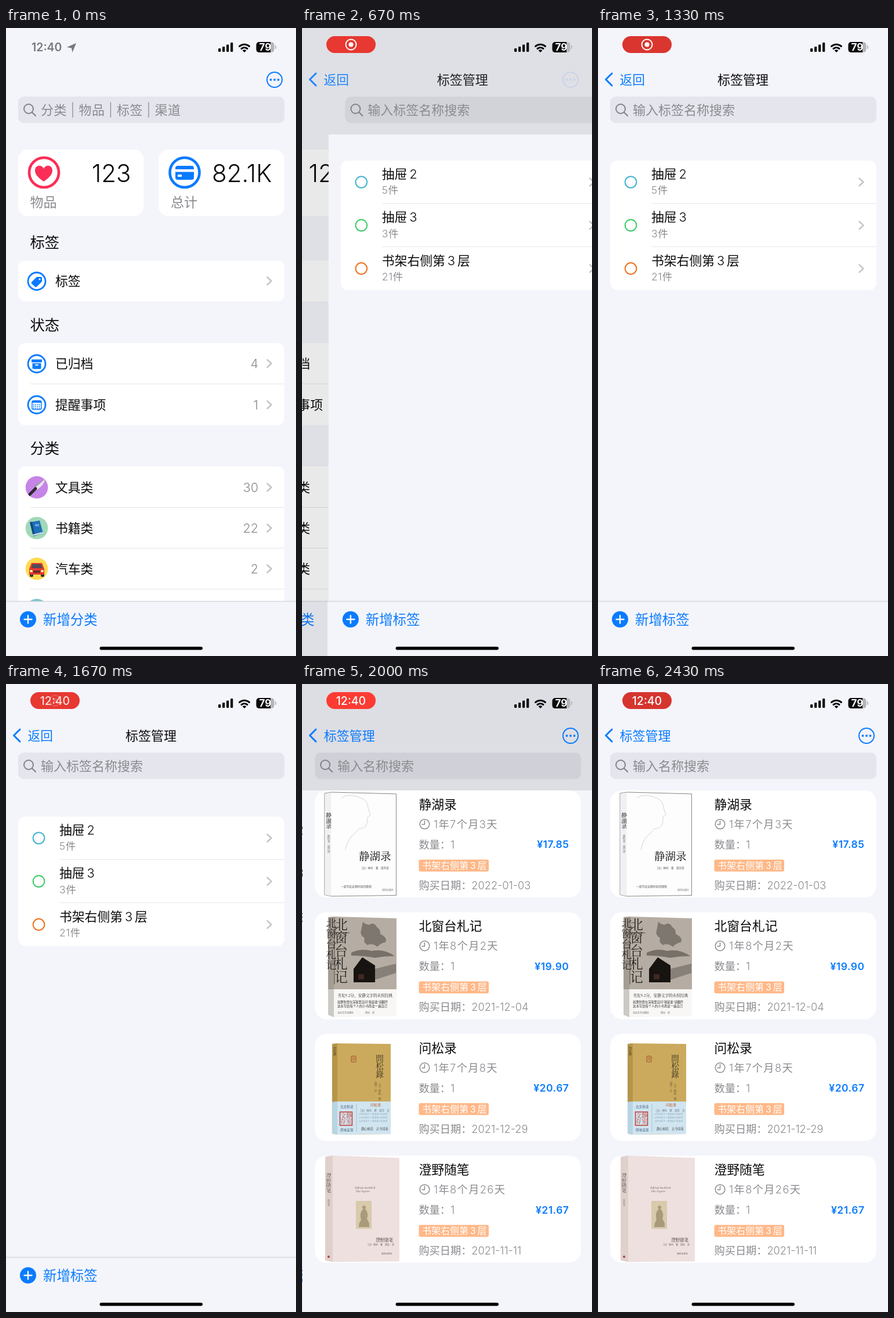
An HTML page that plays this animation: 500 by 1080 pixels, repeating every 2.69 s.

```html
<!DOCTYPE html>
<html lang="zh-CN">
<head>
<meta charset="utf-8">
<style>
html, body { margin: 0; height: 100%; overflow: hidden; background: #f4f5fb; }
svg { display: block; width: 500px; height: 1080px; font-family: Inter, "Noto Sans CJK SC", "Noto Sans CJK", sans-serif; font-weight: 350; }
.serif { font-family: "Noto Serif CJK SC", "Noto Serif", "Noto Sans CJK SC", serif; }
.vert { writing-mode: vertical-rl; }
</style>
</head>
<body>
<svg id="stage" viewBox="0 0 500 1080"></svg>
<script>
const BG = '#f4f5fb', BLUE = '#0a7bff', GREY = '#8a8a8f', INK = '#0b0b0d';
const $ = id => document.getElementById(id);

const rect = (x, y, w, h, fill, r = 0, more = '') =>
  `<rect x="${x}" y="${y}" width="${w}" height="${h}" rx="${r}" fill="${fill}" ${more}/>`;
const circle = (x, y, r, fill, more = '') => `<circle cx="${x}" cy="${y}" r="${r}" fill="${fill}" ${more}/>`;
const ring = (x, y, r, color, w) => circle(x, y, r, 'none', `stroke="${color}" stroke-width="${w}"`);
const shape = (d, fill, more = '') => `<path d="${d}" fill="${fill}" ${more}/>`;
const line = (d, color, w, more = '') =>
  `<path d="${d}" fill="none" stroke="${color}" stroke-width="${w}" stroke-linecap="round" stroke-linejoin="round" ${more}/>`;
// y is the middle of the line of text
const text = (x, y, size, str, fill = INK, more = '') =>
  `<text x="${x}" y="${y + size * .37}" font-size="${size}" fill="${fill}" ${more}>${str}</text>`;
const down = (x, y, size, str, fill = INK, more = '') =>
  `<text class="vert serif" x="${x}" y="${y}" font-size="${size}" fill="${fill}" ${more}>${str}</text>`;
const group = (id, content) => `<g id="${id}">${content}</g>`;
const MEDIUM = 'font-weight="500"', BOLD = 'font-weight="600"', END = 'text-anchor="end"', MID = 'text-anchor="middle"';

const chevron = y => line(`M450.5 ${y - 6.5}l7 6.5-7 6.5`, '#c3c3c8', 2.4);
const rule = (x, y) => rect(x, y, 480 - x, 1, '#e4e4e8');
const search = (hint, more) => rect(21, 118, 459, 45.5, 'rgba(118,118,128,.12)', 10) +
  ring(39, 139, 8, '#828287', 2) + line('M45 145l6 6', '#828287', 2.2) + text(60, 141, 22, hint, GREY, more);
const toolbar = label => rect(-2, 986, 504, 94, BG) + rect(-2, 985.5, 504, 1, '#c8c9ce') +
  circle(38, 1017, 14, BLUE) + line('M31.500 1017h13M38 1010.500v13', '#fff', 2.4) +
  text(64, 1017, 23.4, label, BLUE, MEDIUM);

function homePage() {
  const row = (y, icon, label, count = '') =>
    icon + text(85, y, 21.8, label) + text(435, y, 21.5, count, GREY, END) + chevron(y);
  const badge = (y, art) => ring(53, y, 15, BLUE, 2.8) + art;
  const tag = shape('M44 437l9-9h7q2 0 2 2v6l-9 9q-1.500 1-3 0l-6-5.500q-1-1.200 0-2.500z', BLUE) + circle(58, 432, 1.5, '#fff');
  const box = rect(44, 570, 18, 5, BLUE, 1) + shape('M45.500 576.500h15v8q0 2-2 2h-11q-2 0-2-2z', BLUE) + rect(50, 578.5, 6, 2, '#fff', 1);
  let dots = '';
  for (let i = 0; i < 12; i++) dots += rect(47 + i % 4 * 3.3, 647 + (i / 4 | 0) * 3, 1.8, 1.6, BLUE);
  const calendar = rect(45, 641, 16, 15, 'none', 2.5, `stroke="${BLUE}" stroke-width="1.500"`) + rect(45, 641, 16, 3.5, BLUE) + dots;
  const knife = circle(53, 790, 19.3, '#c684e6') + shape('M67 776q0 8-13 18l-4-4z', '#e4e6ea') +
    shape('M67 776l-17 14-1-2z', '#8d9298') + line('M51 792l-10 10', '#2b2a30', 5);
  const book = circle(53, 860, 19.3, '#a1d8b7') + shape('M41 850l17-3 6 22-17 5z', '#1d6fb8') +
    shape('M41 850l4-1 5 24-3 1z', '#124a82') + line('M47 872l16-4', '#e9eef2', 2) + rect(50, 853, 7, 4, '#5fa4dc');
  const car = circle(53, 930, 19.3, '#ffdb51') + rect(41, 936, 6, 8, '#333', 2) + rect(60, 936, 6, 8, '#333', 2) +
    shape('M44 920h18l4 10v10h-26v-10z', '#e23a2e') + shape('M46 922h14l2.500 7h-19z', '#514b58') +
    rect(41, 932, 5, 4, '#fff0b5', 2) + rect(60, 932, 5, 4, '#fff0b5', 2) + rect(47, 933, 12, 4, '#6b2b2a', 1);
  const heart = 'M65 264C53 256 50 250 50 245C50 235 62 234 65 242C68 234 80 235 80 245C80 250 77 256 65 264Z';
  return rect(21, 209, 216.5, 114.5, '#fff', 17) + rect(263, 209, 217, 114.5, '#fff', 17) +
    ring(65.5, 248.5, 25.5, '#fb2e57', 4.6) + shape(heart, '#fb2e57') +
    ring(308, 248.5, 25.5, BLUE, 4.6) + rect(292, 237, 32, 24, BLUE, 4) + rect(292, 243, 32, 4.5, '#fff') + rect(296, 252, 7, 4, '#fff', 1) +
    text(215.5, 249, 42, '123', INK, END) + text(458.5, 249, 42, '82.1K', INK, END) +
    text(41.5, 299, 23, '物品', GREY) + text(284, 299, 23, '总计', GREY) +
    [['标签', 369], ['状态', 511], ['分类', 723]].map(([s, y]) => text(41.5, y, 25.3, s, INK, MEDIUM)).join('') +
    rect(21, 400, 459, 70, '#fff', 12) + row(435, badge(435.5, tag), '标签') +
    rect(21, 542, 459, 141, '#fff', 12) + row(577, badge(577.5, box), '已归档', 4) + rule(42, 611.5) +
    row(648, badge(648, calendar), '提醒事项', 1) +
    rect(21, 754, 459, 260, '#fff', 12) + row(790, knife, '文具类', 30) + rule(42, 824) +
    row(860, book, '书籍类', 22) + rule(42, 894) + row(930, car, '汽车类', 2) + rule(42, 964.5) +
    circle(53, 1001, 19.3, '#7fc5cd') + toolbar('新增分类');
}

const SHELF = '书架右侧第\u20093\u2009层';

function tagsPage() {
  const rows = [['抽屉\u20092', '5件', '#41b5cc'], ['抽屉\u20093', '3件', '#3bcb66'], [SHELF, '21件', '#ec731f']];
  return rect(0, 183, 500, 897, BG) + rect(21, 228, 459, 222.5, '#fff', 12) +
    rows.map(([name, count, color], i) => {
      const y = 265 + i * 74.3;
      return ring(56.5, y, 9.8, color, 2) + text(92, y - 14, 21.8, name) +
        text(92, y + 14, 17.5, count, GREY, 'letter-spacing=".6"') + chevron(y) + (i ? rule(92, y - 38) : '');
    }).join('') + toolbar('新增标签');
}

const covers = [
  shape('M38 188l12-2 111.500 3v174.500l-111.500 1.500-12-2.500z', '#fdfdfd', 'stroke="#77777a" stroke-width=".9"') +
  shape('M38.500 188.500l11-2v178l-11-2z', '#f1f1f3') +
  line('M67 196q10-8 28-2 18 4 18 19l4 12-5 4q2 20-15 20l-7 8q-12 8-16 28', '#d4d4d6', 1) +
  down(45, 221, 9.5, '静湖录', INK, MEDIUM) + down(45, 259, 4.5, '林屿著　周岸译', '#555') +
  text(97, 296, 18.5, '静湖录', INK, MEDIUM + ' class="serif"') + text(99, 316, 4.5, '［古］林屿　著　周岸译', '#555') +
  text(66, 348, 4.8, '一部写给安静时刻的随想', '#555') + text(137, 355, 4, '南桥出版社', '#777'),

  shape('M44 401l11-1 107 3v168l-107 2-11-4z', '#f8f7f5') + shape('M44 401l11-1 107 3v122h-118z', '#b5ada3') +
  shape('M44 401l10-1v173l-10-4z', '#8b847c', 'opacity=".4"') +
  shape('M104 409q9 8 15 3 6-1 9 6 7 4 6 12 13 6 9 14-9 2-14 8-9-7-17-3-8-5-5-12-9-6-6-13z', '#514b45', 'opacity=".55"') +
  shape('M84 462q18-8 35-3 22-4 40 9-20 0-34 3-20-4-41-4z', '#38342f', 'opacity=".5"') +
  shape('M124 490l37-9v16l-37 12z', '#5b554e', 'opacity=".5"') +
  shape('M88 490l15-20 22 14v29h-37z', '#171310') + rect(96, 499, 10, 9, '#402720') +
  down(66.5, 402, 22.5, '北窗台札记', '#24211f') + down(49.5, 402, 18, '北窗台札记', '#24211f') +
  line('M45 428h36M45 454h10M45 480h10M55 402v114', '#35312d', .8) +
  text(60, 535, 6.8, '书友9.2分，安静文字的永恒经典', '#222', MEDIUM + ' class="serif" letter-spacing="-.2"') +
  text(60, 547, 5.4, '如果你曾在深夜里自问“我是谁”请翻开', '#333', 'letter-spacing="-.2"') +
  text(60, 554, 5.4, '这本写给每个人的小书再读一遍自己', '#333') +
  text(60, 566, 4, '北岸文艺出版社　　　　　周岸　译', '#666'),

  shape('M51 619l9-1 92 1v155l-92 1-9-2z', '#cbaa5d') + shape('M51 619l9-1v157l-9-2z', '#b5954a') +
  shape('M51 719l9-1h92v56l-92 1-9-2z', '#d0e5f0') + shape('M51 719l9-1v57l-9-2z', '#b9d4e2') +
  rect(84, 640, 8, 10, 'none', 1, 'stroke="#a04a2a" stroke-width="1"') + line('M86 643h4M86 646h4', '#a04a2a', 1) +
  down(55.5, 624, 5, '問松錄', '#40321a') + down(133, 637, 13.5, '問松錄', '#37301f', MEDIUM) +
  down(133, 684, 4.5, '［古］林屿　撰', '#5b4a2a') + down(126, 684, 4.5, '周岸　注', '#5b4a2a') +
  text(65, 727, 5.6, '古文新读', '#44607a') + text(65, 767, 5.6, '原味呈现', '#44607a') +
  rect(64.5, 736, 21, 23, 'none', 0, 'stroke="#c3392f" stroke-width="1.500"') +
  down(80, 737, 10, '静室', '#c3392f', MEDIUM) + down(70, 737, 10, '文存', '#c3392f', MEDIUM) +
  line('M93 722v48', '#8eaebe', .6) + text(117, 724, 6, '问松录', '#c05a2f', MEDIUM) +
  text(97, 733, 4.4, '［古］林屿　撰　周岸　注', '#678') +
  [740, 746, 752].map(y => text(97, y, 3.8, '山中问松下一席清谈几则旧话', '#8aa5b5')).join('') +
  text(101, 765, 5.2, '静心细读　古今同看', '#222', MEDIUM + ' class="serif"'),

  shape('M39 813l13-2 115 4v178l-115 1-13-3z', '#eee0df') + shape('M39 813l13-2v183l-13-3z', '#e0d0cc') +
  down(45, 841, 8.5, '澄野随笔', '#574a45') + down(45, 886, 4, '林屿著', '#75655f') + circle(45, 985, 2, '#a8453f') +
  text(90, 866, 4.6, 'Adrian Molwick', '#5a4f4b', 'class="serif"') +
  text(91, 872, 4.6, 'The Papers', '#5a4f4b', 'class="serif" font-style="italic"') +
  rect(92, 889, 27, 48, '#d8caab') + shape('M97 934q0-8 4-12-3-10 1-16 4-6 8-1 4 8 1 15 5 6 4 14z', '#a99a7c') + circle(106, 900, 3, '#a99a7c') +
  text(126, 956, 7.5, '澄野随笔', '#3f3532', MEDIUM + ' class="serif"') +
  text(110, 965, 4, '［古］林屿　著　周岸　译', '#6b5f5b') + text(136, 980, 3.8, '南桥出版社', '#6b5f5b')
];

function itemsPage() {
  const items = [
    ['静湖录', '1年7个月3天', '17.85', '2022-01-03'], ['北窗台札记', '1年8个月2天', '19.90', '2021-12-04'],
    ['问松录', '1年7个月8天', '20.67', '2021-12-29'], ['澄野随笔', '1年8个月26天', '21.67', '2021-11-11']];
  return rect(0, 183, 500, 897, BG) + items.map(([title, age, price, date], i) => {
    const y = 183 + i * 209.4;
    return rect(21, y, 459, 184, '#fff', 20) + covers[i] + text(200.5, y + 24, 21.8, title, INK, MEDIUM) +
      ring(210.5, y + 58, 8.3, GREY, 1.5) + line(`M210.500 ${y + 52.5}v6h-4.500`, GREY, 1.5) +
      text(226, y + 58, 18.2, age, GREY, 'letter-spacing="1.4"') + text(200.5, y + 93, 18.2, '数量：1', GREY) +
      text(459.5, y + 93, 17.5, '¥' + price, BLUE, `${END} ${BOLD} letter-spacing=".5"`) +
      rect(200.5, y + 119, 120.5, 20.5, '#ffb888', 3) + text(206, y + 129, 16, SHELF, '#fff', 'font-weight="400"') +
      text(200.5, y + 163, 18.2, '购买日期：' + date, GREY);
  }).join('');
}

const statusBar =
  group('clock', text(44, 33, 19.5, '12:40', '#77777c', BOLD) + shape('M121 26l-16 7 8 1.500 1.500 7.500z', '#77777c')) +
  group('pill', rect(42, 14, 85, 29, '#f00', 14.5, 'id="pillFill"') +
    group('record', ring(84.5, 28.5, 9, '#fff', 2) + circle(84.5, 28.5, 4, '#fff')) +
    group('pillTime', text(84.5, 29, 19.5, '12:40', '#fff', `${MID} ${MEDIUM}`))) +
  [6, 9, 12.5, 16].map((h, i) => rect(366 + i * 7, 41 - h, 4.3, h, INK, 1.2)).join('') +
  line('M402.500 31.500a13 13 0 0 1 17 0M406 35.500a8 8 0 0 1 10 0', INK, 3) + shape('M407.500 38.500q3.500-2.500 7 0l-3.500 3.500z', INK) +
  rect(431.5, 24, 31, 18, '#b4b5ba', 5.5) + shape('M437 24h19v18h-19q-5.500 0-5.500-5.500v-7q0-5.500 5.500-5.500z', INK) +
  rect(464, 30, 1.8, 6, '#b4b5ba', 1) + text(447, 33, 17, '79', '#fff', MID + ' font-weight="700"');

$('stage').innerHTML = rect(0, 0, 500, 1080, BG) +
  group('home', homePage()) + rect(0, 0, 500, 1080, '#000', 0, 'id="homeDim"') +
  group('tags', tagsPage()) + rect(0, 0, 500, 1080, '#000', 0, 'id="tagsDim"') +
  group('items', itemsPage()) +
  group('homeSearch', search('分类 | 物品 | 标签 | 渠道', 'letter-spacing=".45"')) +
  group('tagsSearch', search('输入标签名称搜索')) + group('itemsSearch', search('输入名称搜索')) +
  group('menu', ring(463, 89, 13, BLUE, 2) + [456.5, 463, 469.5].map(x => circle(x, 89, 1.9, BLUE)).join('')) +
  group('arrow', line('M24 78l-10.500 10.500 10.500 10.500', BLUE, 3)) +
  group('back', text(37.5, 89, 21.7, '返回', BLUE)) + group('title', text(0, 89, 22, '标签管理', 'currentColor')) +
  statusBar + rect(161.5, 1064, 177.5, 5.5, '#000', 2.75);

function place(id, x, opacity = 1) {
  $(id).setAttribute('transform', `translate(${x})`);
  $(id).setAttribute('opacity', opacity);
}

const clamp = v => Math.max(0, Math.min(1, v));
// share of a push still to go: critically damped spring
function remaining(t, start) {
  const s = Math.max(0, t - start) * .032, r = (1 + s) * Math.exp(-s);
  return r < .0015 ? 0 : r;
}

function render(t) {
  const a = remaining(t, 545), b = remaining(t, 1733);
  const navA = remaining(t, 551), navB = remaining(t, 1739);

  place('home', -150 * (1 - a), a > 0 ? 1 : 0);
  place('homeDim', 0, a > 0 ? .095 * (1 - a) : 0);
  place('tags', 500 * a - 150 * (1 - b), a < 1 && b > 0 ? 1 : 0);
  place('tagsDim', 0, b > 0 ? .095 * (1 - b) : 0);
  place('items', 500 * b, b < 1 ? 1 : 0);

  place('homeSearch', -150 * (1 - navA), navA ** 3);
  place('tagsSearch', 500 * navA - 150 * (1 - navB), navB ** 3);
  place('itemsSearch', 500 * navB);
  place('menu', 0, Math.max(navA, 1 - navB));
  place('arrow', 0, 1 - navA);
  place('back', 0, (1 - navA) * navB ** 3);
  place('title', 37.5 + 168.5 * navB + 250 * navA, (1 - navA) * (navB < 1 ? 1 - navB : 1));
  $('title').style.color = navB < 1 ? BLUE : INK;
  $('title').style.fontWeight = navB < 1 ? 350 : 500;

  const shown = clamp((t - 90) / 160), swap = clamp((t - 1540) / 155);
  const glow = clamp(.55 - .62 * Math.cos((t - 450) / 1000 * 2 * Math.PI));
  place('clock', 0, 1 - shown);
  place('pill', 0, shown);
  place('record', 0, 1 - swap);
  place('pillTime', 0, swap);
  $('pillFill').setAttribute('fill', `rgb(${214 + 39 * glow},${53 + 6 * glow},${47 + 4 * glow})`);
}

const LOOP = 2690;
const ticks = [0, 170, 330, 500, 670, 830, 1000, 1170, 1330, 1500, 1670, 1830, 2000, 2170, 2430];
function frame() {
  const now = performance.now() % LOOP;
  render(ticks.filter(t => t <= now).pop());
  requestAnimationFrame(frame);
}
frame();
</script>
</body>
</html>
```
